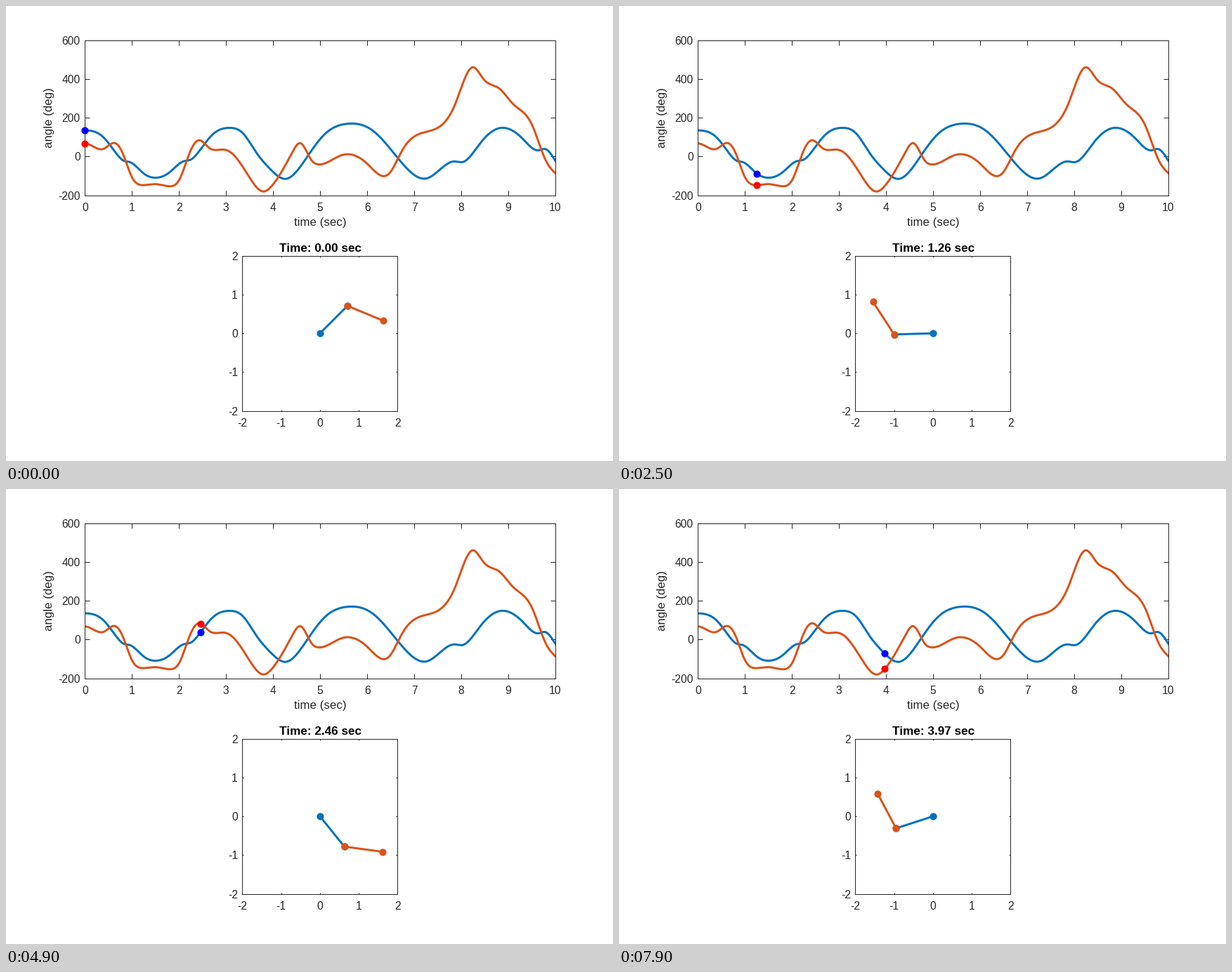
Recreate the animation shown at these times as a matplotlib script. Size 864 by 648 pixels, loop 8000 ms.

```python
import numpy as np
import matplotlib.pyplot as plt
from matplotlib.animation import FuncAnimation

W, H, DPI = 864, 648, 72
FRAMES, STEP = 80, 10 / 199
BLUE, ORANGE, INK = "#0072BD", "#D95319", "#262626"

plt.rcParams["font.family"] = "Liberation Sans"


def spline(*keys):
    """Cubic spline through (s, deg) keys: starts level, ends uncurved."""
    x, y = np.array(keys, float).T
    n, h = len(x), np.diff(x)
    slope = np.diff(y) / h
    a, b = np.eye(n), np.zeros(n)
    a[0, :2], b[0] = (2 * h[0], h[0]), 6 * slope[0]
    for k in range(1, n - 1):
        a[k, k - 1:k + 2] = h[k - 1], 2 * (h[k - 1] + h[k]), h[k]
        b[k] = 6 * (slope[k] - slope[k - 1])
    m = np.linalg.solve(a, b)

    def at(t):
        k = np.clip(np.searchsorted(x, t, side="right") - 1, 0, n - 2)
        d = t - x[k]
        c1 = slope[k] - h[k] * (2 * m[k] + m[k + 1]) / 6
        return y[k] + d * (c1 + d * (m[k] / 2 + d * (m[k + 1] - m[k]) / (6 * h[k])))

    return at


# Swings of the two arms, given by their turns and bends
theta1 = spline(
    (0, 135), (.4, 98), (.7, 6), (.82, -21), (.95, -28), (1.26, -89), (1.51, -109),
    (1.8, -81), (2.1, -24), (2.24, -17), (2.46, 38), (2.72, 115), (3.08, 148),
    (3.36, 120), (3.62, 29), (3.97, -72), (4.26, -115), (4.72, -3), (5.1, 116),
    (5.58, 169), (6.1, 137), (6.7, -22), (7.27, -112), (7.85, -25), (8.03, -28),
    (8.4, 68), (8.8, 146), (9.3, 93), (9.64, 32), (9.78, 39), (10, -22))
theta2 = spline(
    (0, 67.5), (.4, 40), (.63, 70), (.8, 19), (1, -106), (1.22, -147), (1.5, -142),
    (1.8, -153), (2.01, -118), (2.21, 9), (2.42, 84), (2.65, 43), (2.95, 36),
    (3.12, 18), (3.5, -108), (3.8, -180), (3.97, -152), (4.4, 18), (4.58, 69),
    (4.82, -20), (4.95, -40), (5.47, 8), (6, -37), (6.48, -84), (6.65, -12),
    (6.78, 46), (7.2, 124), (7.6, 166), (7.87, 270), (8.24, 460), (8.48, 397),
    (8.8, 352), (9.1, 271), (9.5, 165), (9.8, -22), (10, -86))

fig = plt.figure(figsize=(W / DPI, H / DPI), dpi=DPI, facecolor="white")


def put(x, y, text, size=15.6, ha="center", color=INK, **kw):
    """Text with its baseline at pixel (x, y), y counted from the top."""
    return fig.text(x / W, 1 - y / H, text, fontsize=size, ha=ha, va="baseline",
                    color=color, **kw)


def panel(left, top, right, bottom, xs, ys, tick):
    """Boxed axes with inward ticks on all sides and pixel-placed labels."""
    ax = fig.add_axes([left / W, 1 - bottom / H, (right - left) / W, (bottom - top) / H])
    ax.set(xlim=(xs[0], xs[-1]), ylim=(ys[0], ys[-1]), xticks=xs, yticks=ys)
    ax.tick_params(direction="in", length=tick, width=1, color=INK, top=True,
                   right=True, labelbottom=False, labelleft=False)
    for side in ax.spines.values():
        side.set(color=INK, linewidth=1)
    for x, v in zip(np.linspace(left, right, len(xs)), xs):
        put(x, bottom + 22, f"{v}")
    for y, v in zip(np.linspace(bottom, top, len(ys)), ys):
        put(left - 6.5, y + 6, f"{v}", ha="right")
    return ax


chart = panel(112.3, 48.6, 782, 269.7, range(11), range(-200, 601, 200), 6.7)
stage = panel(336.4, 355.6, 557.45, 576.7, range(-2, 3), range(-2, 3), 2.2)
put(447.2, 313, "time (sec)", 16.9)
put(66.3, 159.3, "angle (deg)", 16.9, rotation=90, rotation_mode="anchor")
title = put(447.1, 349.5, "", 17.1, weight="bold", color="black")

ts = np.linspace(0, 10, 1000)
for angle, color in ((theta1, BLUE), (theta2, ORANGE)):
    chart.plot(ts, angle(ts), color=color, lw=3)


def dotted(ax, color):
    return ax.plot([], [], "o-", color=color, lw=3, ms=10.2, mew=0,
                   clip_on=False, zorder=5)[0]


dot1, dot2 = dotted(chart, "#0000FF"), dotted(chart, "#FF0000")
rod1, rod2 = dotted(stage, BLUE), dotted(stage, ORANGE)


def update(i):
    t = i * STEP
    a, b = theta1(t), theta2(t)
    dot1.set_data([t], [a])
    dot2.set_data([t], [b])
    a, b = np.radians([a, b])
    x, y = np.sin(a), -np.cos(a)
    rod1.set_data([0, x], [0, y])
    rod2.set_data([x, x + np.sin(b)], [y, y - np.cos(b)])
    title.set_text(f"Time: {t:.2f} sec")
    return dot1, dot2, rod1, rod2, title


anim = FuncAnimation(fig, update, frames=FRAMES, interval=100, repeat=True,
                     repeat_delay=0, blit=False)
plt.show()
```
